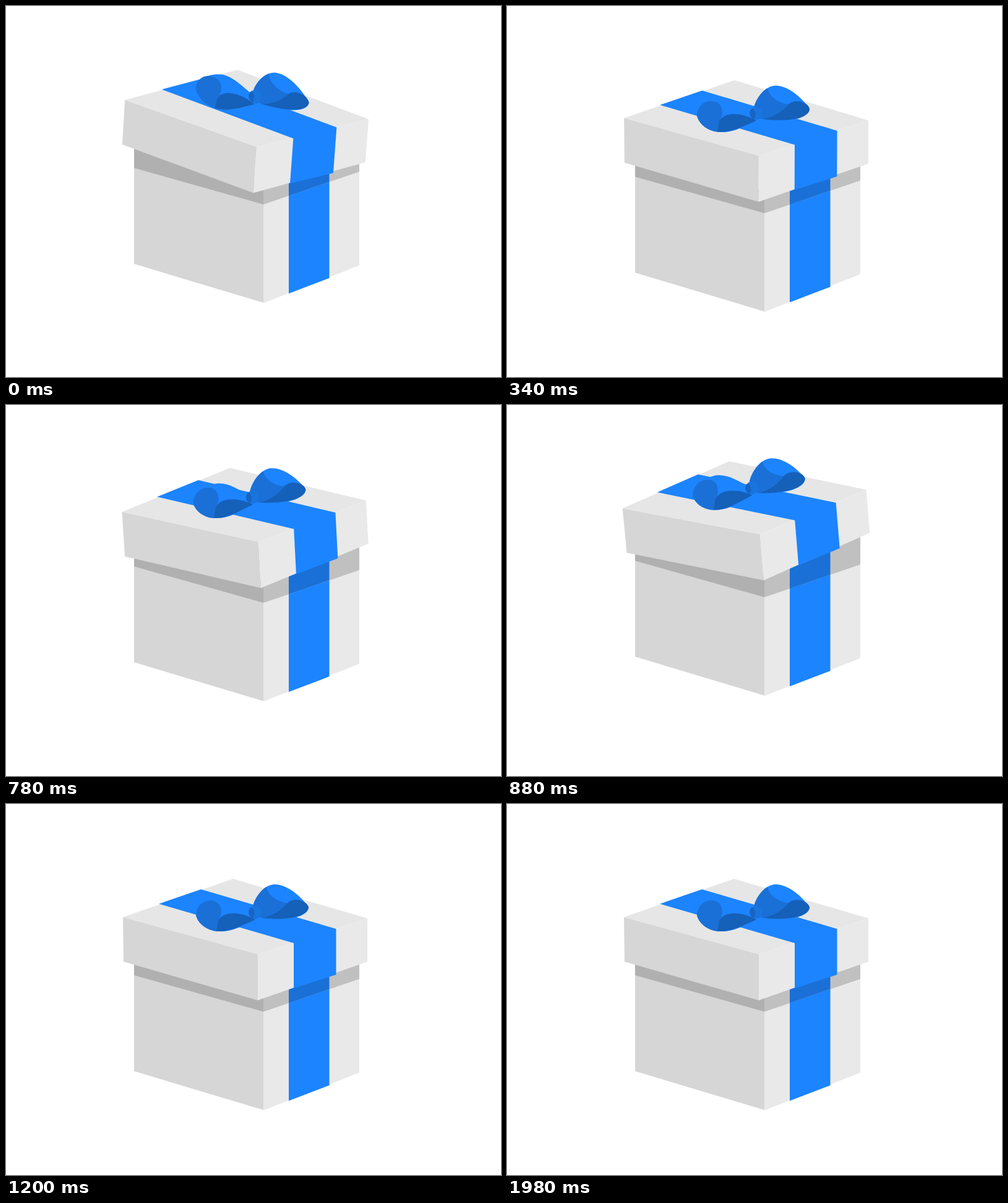
These frames come from a looping animation (800x600 px, 2000 ms). An HTML page:

```html
<!DOCTYPE html>
<html lang="en">
<head>
<meta charset="utf-8">
<title>Gift box</title>
<style>
html, body { margin: 0; width: 100%; height: 100%; overflow: hidden; background: #fff; }
svg { display: block; width: 100vw; height: 100vh; }
.side { fill: #d6d6d6; }
.front { fill: #e9e9e9; }
.top { fill: #e6e6e6; }
.ribbon { fill: #1c84ff; }
.mid { fill: #1a70d6; }
.deep { fill: #1560b8; }
</style>
</head>
<body>
<svg viewBox="0 0 800 600">
  <g id="body">
    <path class="side" d="M207 240L416.500 300V495L207 432Z"/>
    <path class="front" d="M416 300L571 232V434.500L416 495.500Z"/>
    <path class="ribbon" d="M457 282L522.500 253V455L457 480Z"/>
    <path fill="#b0b0b0" d="M207 240L416.500 300V336L207 277Z"/>
    <path fill="#c0c0c0" d="M416 300L571 232V283L416 336Z"/>
    <path class="mid" d="M457 282L522.500 253V299.500L457 322Z"/>
  </g>
  <g id="lid">
    <path class="top" d="M189 183L367 121L584 185L407 243Z"/>
    <path class="side" d="M189 183L407 243V317.500L190 255Z"/>
    <path class="front" d="M407 243L584 185V255L407 317.500Z"/>
    <path class="ribbon" d="M247 161.500L315 138L533.500 202V276L465 298V225Z"/>
  </g>
  <!-- Drawn around the knot at 0,0 -->
  <g id="bow">
    <path class="ribbon" d="M-5-3C-23-13-37-25-56-25C-78-23-96-9-96 5C-92 20-76 31-55 31C-33 31-16 19 0 12Z"/>
    <path class="mid" d="M-96 5C-96-7-87-19-73-19C-60-19-55-11-55 1C-57 9-62 20-61 31C-77 30-92 20-96 5Z"/>
    <path class="deep" d="M0 12C-18 1-51-5-60 14L-63 30.500C-43 33-25 23 0 12Z"/>
    <path class="ribbon" d="M-4-8C-3-20 12-44 30-45C52-46 76-23 86-8C86 3 67 11 42 11C22 11 9 8 2 5Z"/>
    <path class="mid" d="M-4-8C-3-18 7-35 18-41C21-27 35-17 52-15C42-3 27 9 9 9L0 5Z"/>
    <path class="deep" d="M86-8C84-19 62-25 52-15C42-3 27 7 10 9C37 13 84 11 86-8Z"/>
    <circle r="10.500" fill="#1a74de"/>
    <path fill="#1764c2" d="M-7-8C-1-5 0 4-4 9.500C-12 6-13-3-7-8Z"/>
  </g>
</svg>
<script>
const LOOP = 2000;
const [body, lid, bow] = ['body', 'lid', 'bow'].map(id => document.getElementById(id));

// body y, lid y, lid angle, bow x, bow y, bow slope
const rest = [0, 0, 0, 0, 0, 0];
const lean = [-15, -16.5, 4.2, 0, -28, 0.2];
const hop = [-25, -32, -4.7, -7, -41, -0.082];
const steps = [[0, lean], [400, rest], [640, rest], [880, hop], [1140, rest], [LOOP, rest]];

const ease = p => (1 - Math.cos(Math.PI * p)) / 2;

function poseAt(t) {
  const i = steps.findIndex(([end]) => t < end);
  const [t0, from] = steps[i - 1], [t1, to] = steps[i];
  const p = ease((t - t0) / (t1 - t0));
  return from.map((v, k) => v + (to[k] - v) * p);
}

function draw(now) {
  const [bodyY, lidY, angle, bowX, bowY, slope] = poseAt(now % LOOP);
  body.setAttribute('transform', `translate(0 ${bodyY})`);
  lid.setAttribute('transform', `translate(0 ${lidY}) rotate(${angle} 387 219)`);
  bow.setAttribute('transform', `matrix(1 ${slope} ${-0.4 * slope} 1 ${403 + bowX} ${175 + bowY})`);
}

const start = performance.now();
function tick() {
  draw(performance.now() - start);
  requestAnimationFrame(tick);
}
tick();
</script>
</body>
</html>
```
